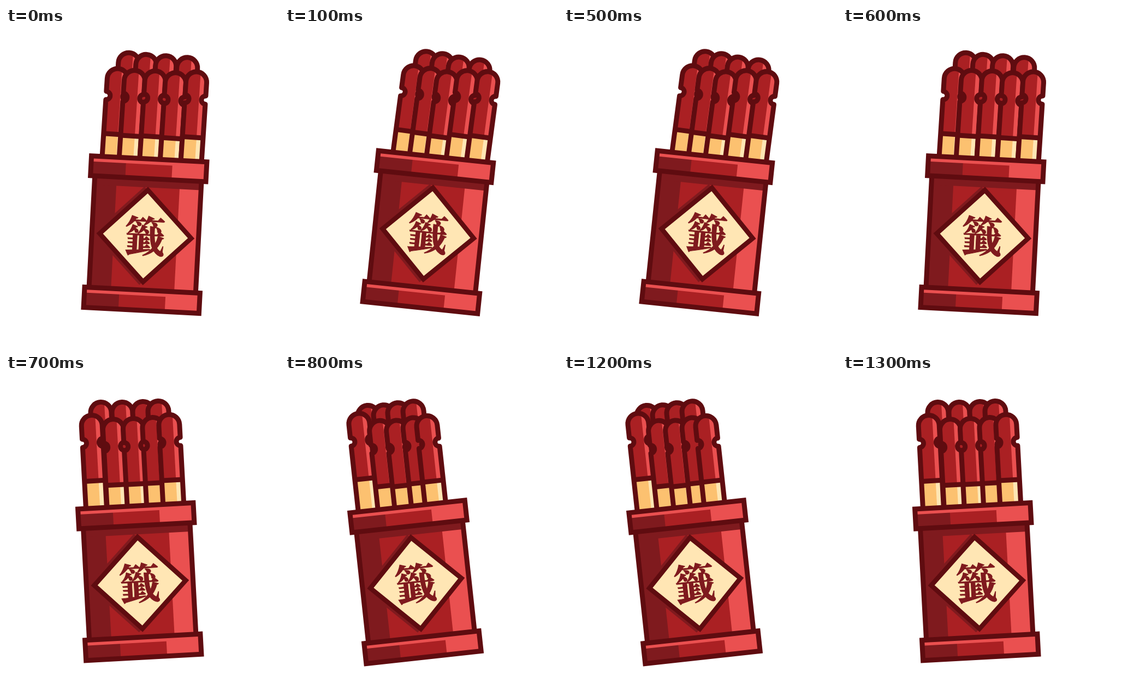
Write an HTML page with a canvas that moves like this. It is 500 px wide and 583 px high and loops after 1.4 s.

```html
<!DOCTYPE html>
<html lang="zh-Hant">
<head>
<meta charset="utf-8">
<style>
html, body { margin: 0; width: 100%; height: 100%; overflow: hidden; background: #fff; }
canvas { display: block; }
</style>
</head>
<body>
<canvas id="stage" width="500" height="583"></canvas>
<script>
const ctx = document.getElementById('stage').getContext('2d');
const LINE = '#5f0c10', DARK = '#7f1a1e', RED = '#aa2023', LIGHT = '#ea5050';
const GOLD = '#fcc170', CREAM = '#ffe6b4';
const RAD = Math.PI / 180;

// Poses from the far right tilt to the far left one. Coordinates of the sticks
// are relative to the middle of the cup's bottom edge.
// base: angle, x, y, extra lean of the sticks; then x and top of the front and back sticks
const poses = [
  { base: [12.3, 243.5, 515, 2.2], x: [-26.3, -2, 15.5, 43.2, 81], top: [-454, -456, -446.5, -455, -469],
    backX: [-19.4, 2.1, 27.4, 65], backTop: [-480, -476, -472, -478] },
  { base: [6, 247, 515.5, 1.6], x: [-55.4, -24.8, 6.1, 42.8, 80.2], top: [-447.7, -446, -443, -449, -451],
    backX: [-35.6, -5.3, 25.1, 63.4], backTop: [-476, -475, -472, -471] },
  { base: [3, 247.5, 520.5, .7], x: [-65.2, -34, 3.7, 41.2, 79.1], top: [-448, -446.4, -447.3, -446, -449.7],
    backX: [-46.3, -14.2, 21.8, 61], backTop: [-478, -476.5, -476, -475] },
  { base: [-3.1, 252.5, 520.5, 0], x: [-72, -33.2, 3.8, 39.3, 69.5], top: [-456, -446.6, -446, -446, -449.7],
    backX: [-54, -15, 23, 51], backTop: [-479, -477, -476, -475.5] },
  { base: [-6.2, 254.5, 520.5, 0], x: [-71.3, -35.2, -4.4, 26.4, 51.6], top: [-465.2, -448, -445, -446.7, -447.4],
    backX: [-53.7, -24.7, 1.5, 29.7], backTop: [-478, -475.6, -476.8, -476.7] },
  { base: [-12.5, 258.5, 519, -2.1], x: [-76.8, -51, -26, -2.5, 33.6], top: [-465.4, -459.5, -452, -449.6, -449],
    backX: [-60.8, -30.9, -9.6, 19.9], backTop: [-486, -478, -477, -476.7] }
];
// Place along the poses for every 100 ms step of the loop
const steps = [2, 1, .5, 0, .5, 1, 2, 3, 4, 4.5, 5, 4.5, 4, 3];

function poseAt(p) {
  const a = poses[Math.floor(p)], b = poses[Math.ceil(p)], k = p % 1, out = {};
  for (const key in a) out[key] = a[key].map((v, i) => v + (b[key][i] - v) * k);
  return out;
}

function box(color, x, y, w, h) {
  ctx.fillStyle = color;
  ctx.fillRect(x, y, w, h);
}

function stick(x, top, lean, notched) {
  const r = 19, notch = 7.5, side = 55, foot = -top - 262;
  ctx.save();
  ctx.translate(x, top);
  ctx.rotate(lean * RAD);
  ctx.beginPath();
  ctx.moveTo(-r, foot);
  if (notched) ctx.arc(-r, side, notch, Math.PI / 2, -Math.PI / 2, true);
  ctx.arc(0, r + 4.5, r, Math.PI, 0);
  if (notched) ctx.arc(r, side, notch, -Math.PI / 2, Math.PI / 2, true);
  ctx.lineTo(r, foot);
  ctx.closePath();
  ctx.save();
  ctx.clip();
  box(RED, -r, 0, 2 * r, foot);
  box(LIGHT, 7, 0, r, foot);
  box(GOLD, -r, 125, 2 * r, foot);
  box(CREAM, 7, 125, r, foot);
  box(LINE, -r, 120, 2 * r, 9);
  ctx.restore();
  ctx.stroke();
  ctx.restore();
}

function bar(top, height) {
  const w = 105.8, y = top + 4.5, h = height - 9;
  box(RED, -w, y, 2 * w, h);
  box(DARK, -w, y, w - 42, h);
  box(LIGHT, 43, y, w - 43, h);
  box(LIGHT, -w, y, 2 * w, 10);
  ctx.strokeRect(-w, y, 2 * w, h);
}

function diamond(x, y, r) {
  ctx.beginPath();
  ctx.moveTo(x, y - r);
  ctx.lineTo(x + r, y);
  ctx.lineTo(x, y + r);
  ctx.lineTo(x - r, y);
  ctx.closePath();
}

function cup() {
  const w = 97.8, top = -260, h = 240, mid = -140.7;
  box(RED, -w, top, 2 * w, h);
  box(DARK, -w, top, w - 57.5, h);
  box(LIGHT, 58.5, top, w - 58.5, h);
  box(DARK, -w, top, 2 * w, 30.5);
  diamond(-6, mid, 90);
  ctx.fill();
  ctx.strokeRect(-w, top, 2 * w, h);
  bar(-286.2, 45.2);
  bar(-46, 46);

  ctx.lineWidth = 8.6;
  diamond(.5, mid, 83.9);
  ctx.fillStyle = CREAM;
  ctx.fill();
  ctx.stroke();

  ctx.fillStyle = ctx.strokeStyle = DARK;
  ctx.lineWidth = 1;
  ctx.font = "900 77px 'Noto Serif CJK TC', 'Noto Sans CJK TC', 'Noto Sans CJK JP', serif";
  ctx.textAlign = 'center';
  ctx.fillText('籤', 0, mid + 29.5);
  ctx.strokeText('籤', 0, mid + 29.5);
}

function draw(now) {
  const pose = poseAt(steps[Math.floor(now / 100) % steps.length]);
  const [angle, x, y, lean] = pose.base;
  box('#fff', 0, 0, 500, 583);
  ctx.save();
  ctx.translate(x, y);
  ctx.rotate(angle * RAD);
  ctx.strokeStyle = LINE;
  ctx.lineWidth = 9;
  ctx.lineJoin = 'round';
  pose.backX.forEach((sx, i) => stick(sx, pose.backTop[i], lean, false));
  pose.x.forEach((sx, i) => stick(sx, pose.top[i], lean, true));
  ctx.lineJoin = 'miter';
  cup();
  ctx.restore();
}

const start = performance.now();
function tick() {
  draw(performance.now() - start);
  requestAnimationFrame(tick);
}
tick();
</script>
</body>
</html>
```
